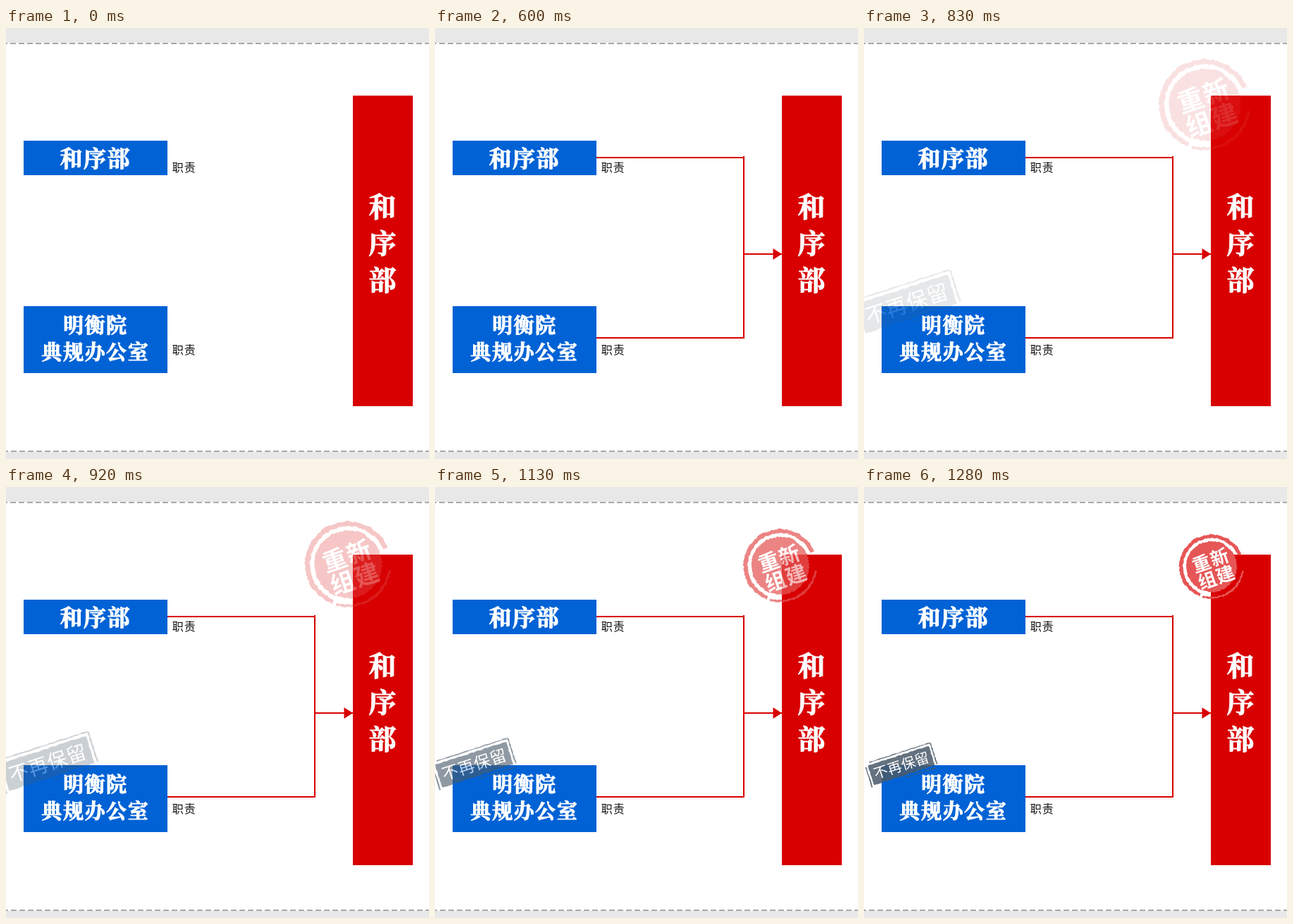
Animation, 600 px wide and 612 px high, one loop 2880 ms. Source, as an HTML page:

```html
<!DOCTYPE html>
<html lang="zh-CN">
<head>
<meta charset="utf-8">
<style>
html, body { margin: 0; width: 100%; height: 100%; overflow: hidden; background: #fff; }
svg { display: block; }
text { font-family: "Noto Sans CJK SC", "Noto Sans CJK", sans-serif; text-anchor: middle; }
.head {
  font-family: "Noto Serif CJK SC", "Noto Sans CJK SC", "Noto Sans CJK", serif;
  font-weight: 900; fill: #fff; stroke: #fff; stroke-width: 1;
}
</style>
</head>
<body>
<svg width="600" height="612" viewBox="0 0 600 612">
  <defs><clipPath id="wipe"><rect id="reveal" x="229" y="170" height="290"/></clipPath></defs>
  <path fill="#e8e8e8" d="M0 0H600V21H0zM0 602H600V612H0z"/>
  <g stroke="#aaa" stroke-width="2" stroke-dasharray="8 4">
    <path stroke-dashoffset="6" d="M0 22H600"/>
    <path stroke-dashoffset="5" d="M0 601H600"/>
  </g>
  <path fill="#0062d5" d="M25 160H229V209H25zM25 395H229V490H25z"/>
  <path fill="#d80000" d="M492 96H577V537H492z"/>
  <g id="labels"></g>
  <g clip-path="url(#wipe)">
    <path fill="none" stroke="#d80000" stroke-width="2" d="M229 184H438M229 440H438M438 182V441M438 321H492"/>
    <path fill="#d80000" d="M479.5 313L492 321L479.5 329z"/>
  </g>
  <g id="closed"></g>
  <g id="rebuilt"></g>
</svg>
<script>
const $ = id => document.getElementById(id);
const clamp = (v, max) => Math.max(0, Math.min(max, v));

let seed = 7;
const jitter = amount => {
  seed = (seed * 16807) % 2147483647;
  return (seed / 2147483647 - 0.5) * 2 * amount;
};

// Text centred on (x, y), with em-square glyphs spaced by gap
const label = (str, x, y, size, gap, attrs) =>
  `<text x="${x + gap / 2}" y="${y + size * 0.38}" font-size="${size}" letter-spacing="${gap}" ${attrs}>${str}</text>`;

const toPath = pts => "M" + pts.map(p => p.map(v => v.toFixed(2))).join("L") + "z";

// Ragged ring segment around the origin, angles in degrees
function band(inner, outer, from, to) {
  const out = [], back = [];
  for (let a = from; a <= to; a += 3) {
    const r = a * Math.PI / 180, o = outer + jitter(0.9), i = inner && inner + jitter(0.7);
    out.push([o * Math.cos(r), o * Math.sin(r)]);
    back.unshift([i * Math.cos(r), i * Math.sin(r)]);
  }
  return toPath(inner ? out.concat(back) : out);
}

// Ragged bar between two corners
function bar(x0, y0, x1, y1, amount) {
  const pts = [], corners = [[x0, y0], [x1, y0], [x1, y1], [x0, y1]];
  corners.forEach(([x, y], i) => {
    const [u, v] = corners[(i + 1) % 4];
    const n = Math.ceil(Math.hypot(u - x, v - y) / 3);
    for (let j = 0; j < n; j++)
      pts.push([x + (u - x) * j / n + jitter(amount), y + (v - y) * j / n + jitter(amount)]);
  });
  return toPath(pts);
}

const head = 'class="head"';
$("labels").innerHTML =
  label("和序部", 126, 185, 32, 1.5, head) +
  label("明衡院", 126, 422, 29, 1.6, head) +
  label("典规办公室", 126, 460, 29, 1.6, head) +
  [..."和序部"].map((c, i) => label(c, 534, 253 + 52 * i, 39, 0, head)).join("") +
  [198, 457].map(y => label("职责", 252.2, y, 16, 1, 'fill="#111" font-weight="300"')).join("");

const white = 'fill="#fff" font-weight="700"';
$("rebuilt").innerHTML =
  `<g transform="translate(493 113)">
    <path fill="#e65656" d="${band(0, 36, 0, 357)}${band(40.5, 45.7, 112, 337)}${band(43, 45.5, 8, 108)}"/>
    <g transform="translate(2.5 3) rotate(-19)">` +
    label("重新", 0, -12.8, 26, 1, white) + label("组建", 0, 12.8, 26, 1, white) +
  "</g></g>";

$("closed").innerHTML =
  `<g transform="translate(53 395.5) rotate(-18)">
    <path fill="#4b5b6b" fill-opacity=".86" d="${bar(-45.5, -14.5, 45.5, 14.5, 0.6)}${
      bar(-42, -18.8, 49, -17.6, 0.4)}${bar(48, -17.6, 49.5, 14, 0.4)}${
      bar(-49.5, -13, -48, 17, 0.4)}${bar(0, 17.4, 46, 18.6, 0.4)}"/>` +
    label("不再保留", 0, -0.5, 20, 0.4, 'fill="#fff" font-weight="500"') +
  "</g>";

// Shrinks towards (x, y) while fading in
function stamp(id, x, y, extra, p) {
  const s = 1 + extra * (1 - p);
  $(id).setAttribute("transform", `translate(${x} ${y}) scale(${s}) translate(${-x} ${-y})`);
  $(id).setAttribute("opacity", p);
}

function draw() {
  const t = performance.now() % 2880;
  const wipe = clamp(Math.floor(t / 30) - 1, 19) / 19;
  const press = clamp(Math.floor((t - 740) / 30), 18) / 18;
  $("reveal").setAttribute("width", 263 * wipe);
  stamp("rebuilt", 516, 123, 0.5, press);
  stamp("closed", 38, 403, 0.6, press);
  requestAnimationFrame(draw);
}
draw();
</script>
</body>
</html>
```
